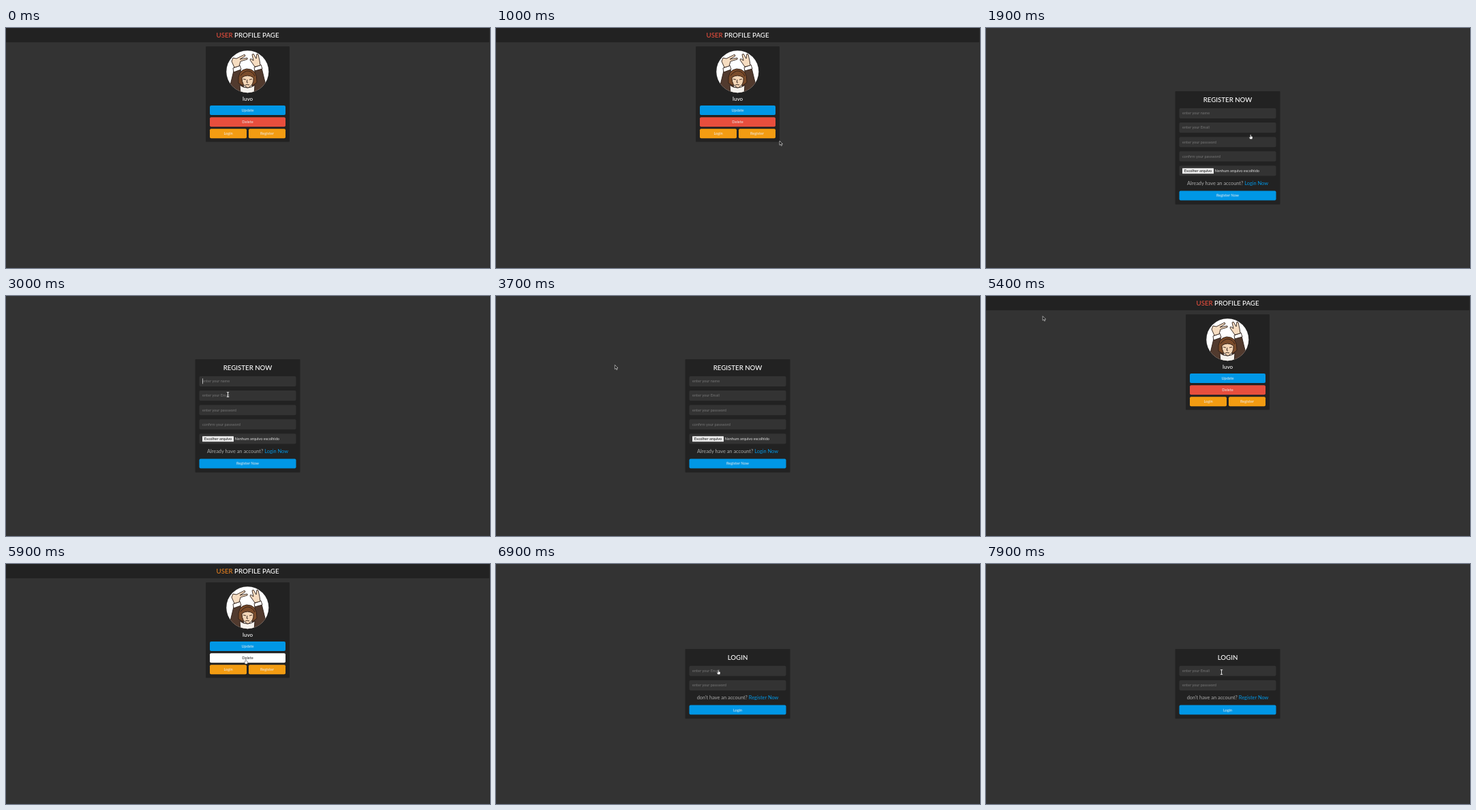
Recreate the animation shown at these times as an HTML page. Size 710 by 353 pixels, loop 8000 ms.

```html
<!DOCTYPE html>
<html lang="en">
<head>
<meta charset="utf-8">
<title>User pages</title>
<style>
  html, body { margin: 0; width: 100%; height: 100%; overflow: hidden; background: #333; }
  svg { display: block; width: 710px; height: 353px; font-family: Lato, "Open Sans", sans-serif; }
  .title { font-size: 9.7px; font-weight: 500; fill: #fff; }
  .small { font-size: 5.6px; }
  .note { font-size: 7.4px; fill: #aaa; }
  .mid { text-anchor: middle; }
</style>
</head>
<body>
<svg id="stage" viewBox="0 0 710 353" xmlns="http://www.w3.org/2000/svg"></svg>
<script>
const LOOP = 8000, STEP = 100;
const BLUE = '#0097e6', RED = '#e84e3d', ORANGE = '#f39c12', DARK = '#222';

const rect = (x, y, w, h, fill, r = 0) =>
  `<rect x="${x}" y="${y}" width="${w}" height="${h}" rx="${r}" fill="${fill}"/>`;
const text = (x, y, cls, content, fill) =>
  `<text x="${x}" y="${y}" class="${cls}"${fill ? ` fill="${fill}"` : ''}>${content}</text>`;
const path = (d, fill, stroke = '#2b1c16', width = 0.9) =>
  `<path d="${d}" fill="${fill}" stroke="${stroke}" stroke-width="${width}" stroke-linejoin="round"/>`;

const button = (id, x, y, w, label, fill) =>
  `<g id="${id}" data-fill="${fill}">${rect(x, y, w, 14, fill, 2)}` +
  text(x + w / 2, y + 8.9, 'small mid', label, '#eee') + '</g>';

const field = (y, label) =>
  rect(283.5, y, 142, 15, '#333', 2) + text(288, y + 9.3, 'small', label, '#757575');

const note = (y, question, link) =>
  `<text x="354.5" y="${y}" class="note mid">${question} <tspan fill="${BLUE}">${link}</tspan></text>`;

const formCard = (y, h, title) =>
  rect(277.5, y, 154, h, DARK, 1) + text(354.5, y + 15.7, 'title mid', title);

const avatar = () => `
  <clipPath id="disc"><circle cx="354.3" cy="64.2" r="31"/></clipPath>
  <circle cx="354.3" cy="64.2" r="31" fill="#fff"/>
  <g clip-path="url(#disc)">
    ${path('M334 63 L344 61 L346 78 L352 96 L326 96 Z', '#513a2e')}
    ${path('M365 61 L375 59 L384 96 L357 96 L364 78 Z', '#513a2e')}
    ${path('M343 84 Q354 92 365 84 L364 97 H344 Z', '#f7f3ee')}
    ${path('M333 59 L343 55 L345 61 L334 65 Z', '#fff')}
    ${path('M364 58 L374 54 L376 60 L365 63 Z', '#fff')}
    ${path('M335 58 L331 49 L333 44 L338 45 L350 39 L351 41 L343 46 L354 44 L354 46 L344 49 L342 56 Z', '#f6dcc0')}
    ${path('M365 57 L358 47 L359 45 L363 48 L361 39 L363 38 L367 45 L368 38 L370 39 L372 48 L373 55 Z', '#f6dcc0')}
    ${path('M341 81 Q339 62 353 60 Q369 60 368 80 L363 84 H346 Z', '#7b4c2b')}
    ${path('M346 73 Q354 67 363 73 Q364 84 355 88 Q346 85 346 73 Z', '#f3d5b6')}
    ${path('M344 70 Q350 63 355 63 Q362 64 365 71 M348 75 l4 1 M357 76 l4 -1 M354 76 l-1 4 h2 M351 84 q3 -2 6 0', 'none')}
  </g>`;

const profile = () =>
  rect(0, 0, 710, 21, DARK) +
  `<text x="354.5" y="13.7" class="title mid"><tspan id="accent">USER</tspan> PROFILE PAGE</text>` +
  rect(293, 27, 123, 140.5, DARK, 1) + avatar() +
  `<text x="354.5" y="107" class="mid" font-size="8" font-weight="500" fill="#fff">luvo</text>` +
  button('update', 299, 114, 111, 'Update', BLUE) +
  button('delete', 299, 131.2, 111, 'Delete', RED) +
  button('login', 299, 148.2, 54, 'Login', ORANGE) +
  button('register', 356, 148.2, 54, 'Register', ORANGE);

const register = () =>
  formCard(93, 166.5, 'REGISTER NOW') +
  ['enter your name', 'enter your Email', 'enter your password', 'confirm your password']
    .map((label, i) => field(118 + i * 21.1, label)).join('') +
  field(202.5, '') + rect(288, 206.3, 46, 8, '#efefef', 0.6) +
  text(311, 212, 'small mid', 'Escolher arquivo', '#111') +
  text(335.5, 212, 'small', 'Nenhum arquivo escolhido', '#ddd') +
  note(231.3, 'Already have an account?', 'Login Now') +
  button('submitRegister', 283.5, 239.5, 142, 'Register Now', BLUE) +
  `<g id="caret">${rect(288, 121.3, 0.7, 8, '#eee')}</g>`;

const login = () =>
  formCard(125, 102.5, 'LOGIN') +
  field(149.8, 'enter your Email') + field(170.9, 'enter your password') +
  note(199.4, "don't have an account?", 'Register Now') +
  button('submitLogin', 283.5, 207.6, 142, 'Login', BLUE);

// Each pointer is drawn around its hot spot.
const pointers = {
  arrow: path('M0 0 V6.3 L1.5 5 L2.5 7.3 L3.6 6.8 L2.6 4.6 H4.5 Z', '#111', '#eee', 0.6),
  hand: path('M-.5 0 Q.2 -.7 .8 0 V2.3 L3 2.8 V5 L2.3 6.5 H-.6 L-2.2 3.8 L-1.6 3.2 L-.5 4 Z', '#fff', '#222', 0.4),
  beam: path('M-1.7 -3.3 H1.7 M0 -3.3 V3.3 M-1.7 3.3 H1.7', 'none', '#f4f4f4', 0.9)
};

const pages = { profile, register, login };
const stage = document.getElementById('stage');
stage.innerHTML = rect(0, 0, 710, 353, '#333') +
  Object.entries(pages).map(([id, draw]) => `<g id="${id}Page">${draw()}</g>`).join('') +
  rect(709, 0, 1, 353, '#292929') + '<g id="pointer"></g>';
const get = id => document.getElementById(id);

// time, x, y, pointer kind (null hides it)
const route = [
  [0, 500, 345, null],
  [600, 500, 345, 'arrow'], [1000, 416, 166, 'arrow'], [1200, 402, 160, 'hand'],
  [1400, 388, 157, 'hand'], [2000, 388, 157, 'beam'], [2500, 345, 127, 'beam'],
  [2700, 345, 127, 'beam'], [3000, 325.5, 145, 'beam'], [3200, 262, 128, 'arrow'],
  [3500, 175, 102, 'arrow'], [4100, 173, 100, 'arrow'], [4500, 54.5, 30.5, 'arrow'],
  [4700, 18, 3, 'arrow'], [5100, 18, 3, null], [5300, 18, 3, 'arrow'],
  [5800, 344, 136, 'hand'], [5900, 351.5, 140.5, 'hand'], [6899, 351.5, 140.5, 'hand'],
  [6900, 326, 156, 'hand'], [7400, 326, 156, 'beam'], [7900, 345.5, 159, 'beam'],
  [LOOP, 345.5, 159, 'beam']
];

function pointerAt(t) {
  const i = route.findIndex(key => key[0] > t) - 1;
  const [t0, x0, y0, kind] = route[i], [t1, x1, y1] = route[i + 1];
  const k = (t - t0) / (t1 - t0);
  return { x: x0 + (x1 - x0) * k, y: y0 + (y1 - y0) * k, kind };
}

const pageAt = t =>
  t < 1900 ? 'profile' : t < 5300 ? 'register' : t < 6900 ? 'profile' : 'login';

function hover(id, p) {
  const group = get(id), [box, label] = group.children;
  const { x, y, width, height } = box.getBBox();
  const over = p.kind && p.x > x && p.x < x + width && p.y > y && p.y < y + height;
  box.setAttribute('fill', over ? '#fff' : group.dataset.fill);
  label.setAttribute('fill', over ? DARK : '#eee');
  return over;
}

function render(t) {
  const page = pageAt(t), p = pointerAt(t);
  for (const id in pages) get(id + 'Page').style.display = id === page ? '' : 'none';
  if (page === 'profile') {
    ['update', 'login', 'register'].forEach(id => hover(id, p));
    get('accent').setAttribute('fill', hover('delete', p) ? '#e8811f' : RED);
  }
  get('caret').style.display = t >= 2700 && t < 3200 ? '' : 'none';
  const pointer = get('pointer');
  pointer.innerHTML = p.kind ? pointers[p.kind] : '';
  pointer.setAttribute('transform', `translate(${p.x} ${p.y})`);
}

const start = performance.now();
function tick() {
  const t = (performance.now() - start) % LOOP;
  render(Math.floor(t / STEP) * STEP);
  requestAnimationFrame(tick);
}
tick();
</script>
</body>
</html>
```
